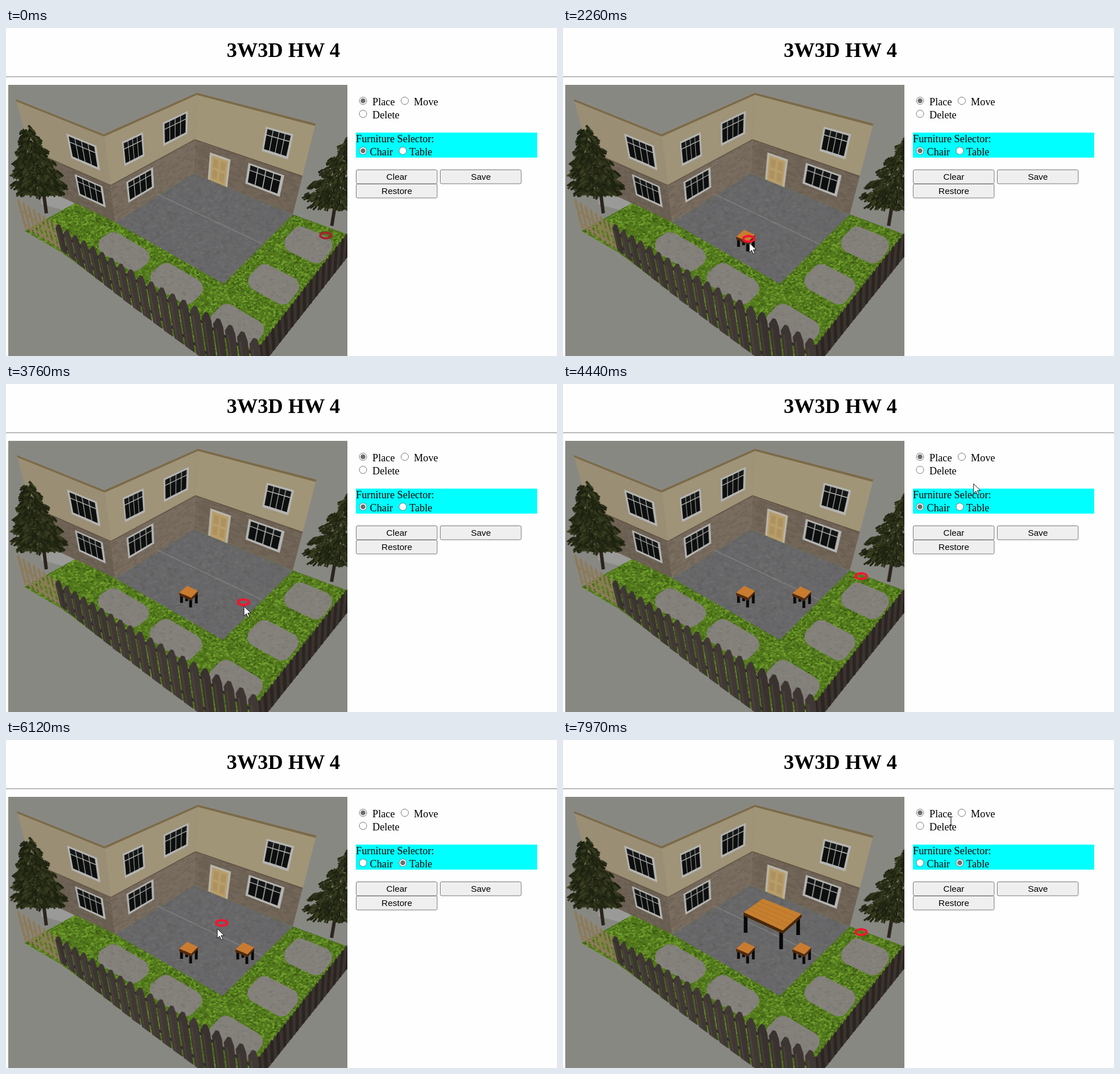
Write an HTML page with a canvas that moves like this. It is 970x577 px and loops after 8 s.

```html
<!DOCTYPE html>
<html lang="en">
<head>
<meta charset="utf-8">
<title>Furniture placer</title>
<style>
  html, body { margin: 0; width: 100%; height: 100%; overflow: hidden; background: #fefefe; }
  #view { position: absolute; left: 4px; top: 100px; width: 597px; height: 477px; overflow: hidden; background: #888883; }
  #scene { position: absolute; left: 0; top: 0; transform-origin: 0 0; }
  svg { position: absolute; left: 0; top: 0; }
  .serif { font: 18.3px "Liberation Serif", serif; }
  .sans { font: 15.4px "Liberation Sans", sans-serif; text-anchor: middle; }
  .title { font: bold 36.4px "Liberation Serif", serif; }
  .button rect { fill: #efefef; stroke: #767676; }
  .radio { fill: #fff; stroke: #767676; }
</style>
</head>
<body>
<div id="view"><canvas id="scene" width="610" height="485"></canvas></div>
<svg width="970" height="577">
  <defs>
    <g id="stool">
      <path d="M309 370v15M318 368v14M325 376v17M335 367v19" stroke="#080808" stroke-width="5"/>
      <path d="M305 367l21 9 12-12v4l-12 13-21-9z" fill="#50290c"/>
      <path d="M319 355l19 9-12 12-21-9z" fill="#c97b30"/>
    </g>
    <clipPath id="viewClip"><rect x="4" y="100" width="597" height="477"/></clipPath>
  </defs>
  <g id="table">
    <path d="M321.500 306v33M384 336v32M414 313v30" stroke="#080808" stroke-width="6.500"/>
    <path d="M318 303l69 32 33-29v6l-33 29-69-32z" fill="#4b2809"/>
    <path d="M352 279l68 27-33 29-69-32z" fill="#c57f2f"/>
    <path d="M345 284l68 28M338 289l68 29M331 294l68 30M325 298l69 31" stroke="#a8631d" opacity=".5"/>
  </g>
  <use id="stoolA" href="#stool"/>
  <use id="stoolB" href="#stool" x="99" y="1"/>
  <g clip-path="url(#viewClip)">
    <ellipse id="ring" rx="9.700" ry="4.900" fill="none" stroke-width="4"/>
  </g>

  <path d="M0 85.500h970" stroke="#9a9a9a"/><path d="M0 86.500h970" stroke="#dcdcdc"/>
  <text class="title" x="388.500" y="51">3W3D HW 4</text>
  <rect x="616" y="184" width="319" height="44" fill="#0ff"/>
  <g class="serif">
    <text x="645" y="135.500">Place</text><text x="718" y="135.500">Move</text>
    <text x="645" y="158.500">Delete</text><text x="616" y="200.500">Furniture Selector:</text>
    <text x="640.500" y="223.500">Chair</text><text x="710" y="223.500">Table</text>
  </g>
  <g class="radio">
    <circle cx="628.500" cy="128" r="6.500"/><circle cx="702" cy="128" r="6.500"/>
    <circle cx="628.500" cy="151" r="6.500"/><circle cx="628.500" cy="216" r="6.500"/>
    <circle cx="698.500" cy="216" r="6.500"/>
  </g>
  <circle cx="628.500" cy="128" r="4.300" fill="#6d6d6d"/>
  <circle id="choice" cy="216" r="4.300" fill="#6d6d6d"/>
  <g class="button sans">
    <rect x="616.500" y="249.500" width="142.500" height="24.500" rx="2.500"/><text x="688" y="266.500">Clear</text>
    <rect x="764.500" y="249.500" width="142.500" height="24.500" rx="2.500"/><text x="836" y="266.500">Save</text>
    <rect x="616.500" y="274.500" width="142.500" height="24.500" rx="2.500"/><text x="688" y="291.500">Restore</text>
  </g>
  <path id="arrow" d="M0 0v17l4-4 3 6.500 2.700-1.200-3-6.300h5.500z" fill="#fff" stroke="#111"/>
  <path id="beam" d="M-3-7h2.500l.5 1 .5-1h2.500M0-6v13M-3 8h2.500l.5-1 .5 1h2.500" fill="none" stroke="#222" stroke-width="1.200"/>
  <circle id="click" cx="699" cy="216" r="13" fill="#ff0" opacity=".5"/>
</svg>
<script>
const $ = id => document.getElementById(id);
const lerp = (a, b, k) => a + (b - a) * k;
const clamp = k => Math.max(0, Math.min(1, k));
let seed = 7;
const rnd = () => (seed = seed * 16807 % 2147483647) / 2147483647;
const pick = list => list[Math.floor(rnd() * list.length)];

const g = $('scene').getContext('2d');
g.translate(-4, -100);

// Polygons are flat lists x, y, ...; quads start top left and run clockwise.
function path(p) {
  g.beginPath();
  for (let i = 0; i < p.length; i += 2) g.lineTo(p[i], p[i + 1]);
  g.closePath();
}
function fill(p, color) { path(p); g.fillStyle = color; g.fill(); }
function line(a, b, color, width) {
  g.beginPath(); g.moveTo(...a); g.lineTo(...b);
  g.strokeStyle = color; g.lineWidth = width; g.stroke();
}
function at(q, u, v) {
  return [0, 1].map(i => lerp(lerp(q[i], q[2 + i], u), lerp(q[6 + i], q[4 + i], u), v));
}
const part = (q, u0, v0, u1, v1) =>
  [...at(q, u0, v0), ...at(q, u1, v0), ...at(q, u1, v1), ...at(q, u0, v1)];

// Scatters short flecks inside a polygon.
function flecks(p, colors, count, size) {
  const xs = p.filter((_, i) => i % 2 === 0), ys = p.filter((_, i) => i % 2);
  const x0 = Math.min(...xs), x1 = Math.max(...xs), y0 = Math.min(...ys), y1 = Math.max(...ys);
  g.save(); path(p); g.clip();
  for (let i = 0; i < count; i++) {
    g.fillStyle = pick(colors);
    g.fillRect(lerp(x0, x1, rnd()), lerp(y0, y1, rnd()), size * (0.6 + rnd()), size * (0.5 + rnd() * 0.6));
  }
  g.restore();
}

function wall(q, cream, brick) {
  fill(q, cream);
  const low = part(q, 0, 0.58, 1, 1), rows = 18, cols = 22;
  fill(low, brick);
  for (let r = 0; r < rows; r++) {
    for (let c = 0; c < cols; c++) {
      const u = Math.max(0, (c - (r % 2) / 2) / cols);
      fill(part(low, u, r / rows, u + 0.85 / cols, (r + 0.75) / rows),
        pick(['#574c4138', '#87796838', '#6b5f5238', '#95877528']));
    }
  }
  line(at(q, 0, 0.58), at(q, 1, 0.58), '#5e5141', 1.5);
  fill(part(q, 0, 0, 1, 0.026), '#7b6a48');
}
function windowIn(q, u0, u1, upper) {
  const frame = upper ? part(q, u0, 0.175, u1, 0.455) : part(q, u0, 0.635, u1, 0.875);
  fill(frame, '#b4b5b3');
  for (let c = 0; c < 4; c++) {
    const u = 0.065 + c * 0.22;
    fill(part(frame, u, 0.08, u + 0.195, 0.3), '#151716');
    fill(part(frame, u, 0.335, u + 0.195, 0.9), '#0d0f0e');
  }
}
function doorIn(q) {
  const frame = part(q, 0.145, 0.67, 0.34, 1);
  fill(frame, '#b9b5a9');
  fill(part(frame, 0.1, 0.08, 0.9, 1), '#b79d6a');
  for (const u of [0.2, 0.56]) for (const v of [0.18, 0.58])
    fill(part(frame, u, v, u + 0.24, v + 0.3), '#ad925f');
}
function paver(q) {
  const mid = i => [(q[i] + q[(i + 2) % 8]) / 2, (q[i + 1] + q[(i + 3) % 8]) / 2];
  g.beginPath(); g.moveTo(...mid(6));
  for (let i = 0; i < 8; i += 2) g.arcTo(q[i], q[i + 1], ...mid(i), 17);
  g.closePath(); g.fillStyle = '#84817b'; g.fill();
  g.save(); g.clip();
  flecks(q, ['#92908930', '#6f6c6840'], 260, 4);
  g.restore();
}
function tree(topX, topY, baseX, baseY, spread) {
  line([baseX, baseY - 30], [baseX + (baseX - topX) * 0.35, baseY + 36], '#2b241c', 6);
  for (let i = 0; i < 1500; i++) {
    const k = rnd() ** 0.6, side = rnd() * 2 - 1;
    const tier = 0.8 + 0.2 * Math.sin(k * 38);
    const x = lerp(topX, baseX, k) + side * spread * Math.min(1, 0.08 + k * 1.2) * tier;
    const y = lerp(topY, baseY, k) - Math.abs(side) * 4 + rnd() * 6;
    line([x, y], [x + side * 8, y + 3 + rnd() * 5],
      pick(['#1b2010', '#262a15', '#2d3319', '#383d20', '#1f2412']), 3.2);
  }
}
function picket(x, y, w, h, lean, color) {
  const dx = h * lean;
  fill([x - w / 2, y + w * 0.55, x - w * 0.12, y, x + w * 0.2, y + w * 0.1, x + w / 2, y + w * 0.9,
    x + w / 2 + dx, y + h + w * 0.4, x - w / 2 + dx, y + h - w * 0.3], color);
  line([x - w * 0.2, y + w], [x - w * 0.2 + dx, y + h], '#75685a35', w * 0.18);
}

function drawScene() {
  const left = [17, 125, 172, 187, 193, 342, 61, 280];
  const middle = [172, 187, 336, 114, 330, 256, 193, 342];
  const right = [336, 114, 545, 168, 505, 328, 330, 256];
  const patio = [330, 256, 505, 328, 383, 450, 193, 342];
  const lawn = [122, 308, 193, 342, 330, 256, 505, 328, 604, 364, 604, 396, 442, 590, 345, 580, 100, 396, 33, 357];
  const side = [604, 358, 436, 574, 440, 607, 600, 404];

  fill([62, 282, 82, 291, 122, 308, 100, 320, 62, 310], '#9a9a98');
  wall(left, '#9a8e74', '#6b6053');
  wall(middle, '#9f9378', '#776b5e');
  wall(right, '#a19577', '#6f6356');
  for (const upper of [true, false]) {
    windowIn(left, 0.54, 0.89, upper);
    windowIn(middle, 0.18, upper ? 0.41 : 0.5, upper);
    windowIn(right, upper ? 0.605 : 0.505, 0.842, upper);
  }
  windowIn(middle, 0.63, 0.907, true);
  doorIn(right);

  fill(lawn, '#52781d');
  flecks(lawn, ['#6f9b2a', '#3c5c13', '#5f8a22', '#456a16', '#73a030'], 16000, 3);
  fill(patio, '#676769');
  flecks(patio, ['#79797b30', '#54545730', '#70707230'], 3000, 5);
  line([268, 293], [452, 380], '#96969680', 1.5);
  // Pavers sit on the patio's own grid, outside its near and right edges.
  for (const [u, v] of [[1.31, 0.23], [1.31, 0.75], [1.31, 1.3], [0.25, 1.25], [0.73, 1.25]])
    paver(part(patio, u - 0.2, v - 0.15, u + 0.2, v + 0.15));

  tree(36, 172, 62, 290, 45);
  tree(614, 184, 584, 312, 60);

  for (let i = 0; i < 8; i++) picket(22 + i * 9, 300 + i * 6, 5, 54 - i * 0.8, 0.25, '#8d7b59');
  line([27, 322], [92, 366], '#8d7b59', 3);
  line([34, 345], [97, 386], '#8d7b59', 3);

  fill(side, '#302a26');
  for (let i = 0; i < 30; i++) {
    const u = i / 30, [x, y] = at(side, u, 0), [bx, by] = at(side, u, 1);
    fill([x - 2.5, y + 2, x, y - 4, x + 2.5, y, bx + 2.5, by - 2, bx - 2.5, by + 3], i % 2 ? '#3b332e' : '#2b2522');
  }
  line([96, 362], [436, 574], '#2d2724', 4);
  line([100, 383], [360, 577], '#2d2724', 4);
  for (let i = 0; i < 20; i++) {
    const k = i / 19, d = 345 * (0.78 * k + 0.22 * k * k);
    picket(93 + d, 345 + 0.58 * d + 6 * Math.sin(k * Math.PI), 12 + k * 7, 50 + 0.17 * d, 0.2 - 0.0003 * d,
      pick(['#3c3531', '#39322f', '#403834']));
  }
}
drawScene();

// Pointer stops: time, x, y; each leg eases in and out.
const stops = [
  [140, 868, 577], [900, 336, 325], [1250, 386, 345], [1530, 328, 324], [1900, 328, 378], [2250, 328, 378],
  [2750, 428, 411], [3250, 390, 378], [3700, 419, 391], [3900, 419, 391], [4300, 746, 184], [4800, 626, 140],
  [5230, 699, 215], [5500, 699, 215], [6100, 372, 332], [6450, 372, 332], [6950, 492, 425], [7210, 456, 416],
  [7510, 456, 416], [7930, 683, 142]];
function pointerAt(t) {
  const i = stops.findLastIndex(s => s[0] <= t);
  const a = stops[Math.max(0, i)], b = stops[Math.min(stops.length - 1, i + 1)];
  const k = clamp((t - a[0]) / (b[0] - a[0] || 1)), ease = k * k * (3 - 2 * k);
  return [lerp(a[1], b[1], ease), lerp(a[2], b[2], ease)];
}
// The ring trails the pointer and rests on the lawn once the pointer leaves the view.
function ringAt(t) {
  const [x, y] = pointerAt(t - 80), rest = t < 1000 ? [563, 365] : [525, 338];
  const away = clamp((x - 500) / 100);
  return [lerp(x - 1, rest[0], away), lerp(y - 7, rest[1], away)];
}
const show = (id, on) => $(id).style.display = on ? '' : 'none';
const place = (id, [x, y]) => $(id).setAttribute('transform', `translate(${x} ${y})`);

function frame(now) {
  const t = now % 8000, pointer = pointerAt(t);
  // The first click nudges the camera.
  $('scene').style.transform = t < 2030 ? 'none' : 'matrix(1,0,-.01,1,2.1,0)';
  show('stoolA', t >= 2030);
  show('stoolB', t >= 3850);
  show('table', t >= 6250);
  show('click', t >= 5300 && t < 5500);
  show('arrow', t >= 140 && t < 7900);
  show('beam', t >= 7900);
  place('arrow', pointer);
  place('beam', pointer);
  place('ring', ringAt(t));
  $('ring').setAttribute('stroke', t < 500 ? '#a3252f' : '#f0162f');
  $('choice').setAttribute('cx', t < 5400 ? 628.5 : 698.5);
  requestAnimationFrame(frame);
}
requestAnimationFrame(frame);
</script>
</body>
</html>
```
